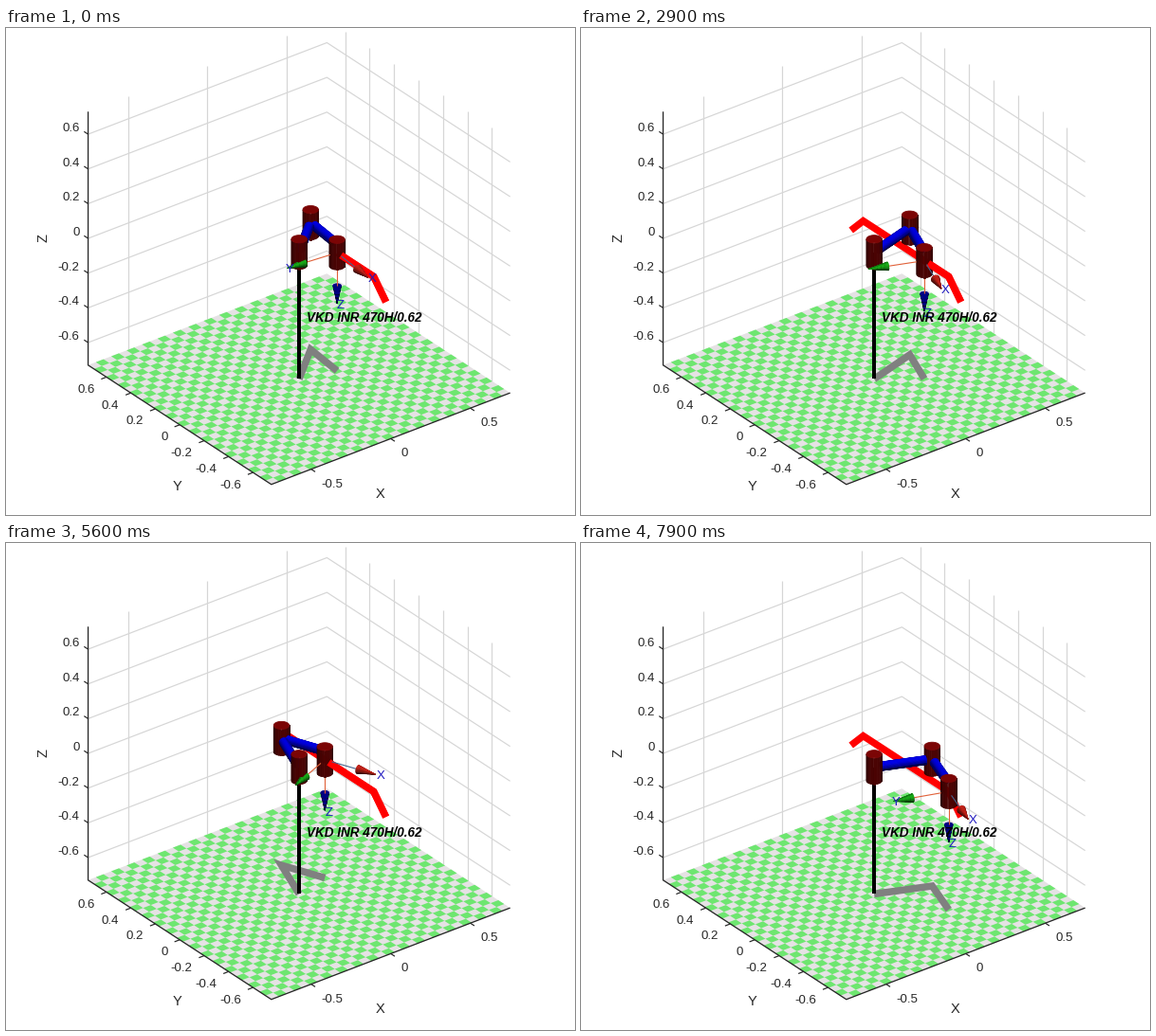
Write a matplotlib script that moves like this. It is 600 px wide and 514 px high and loops after 8000 ms.

```python
import numpy as np
import matplotlib.pyplot as plt
from matplotlib.animation import FuncAnimation
from matplotlib.collections import PolyCollection

W, H, DPI = 600, 514, 100
PX = 72 / DPI
FRAMES, STEP = 80, 100
plt.rcParams["font.family"] = "Liberation Sans"

# Orthographic view, azimuth -37.5, elevation 30
SCALE, ORIGIN = 211.6, np.array([309.1, 236.7])
AZ, EL = np.radians(37.5), np.radians(30)
CA, SA = np.cos(AZ), np.sin(AZ)
VIEW = np.array([-SA * np.cos(EL), -CA * np.cos(EL), np.sin(EL)])
LIGHT = np.array([-0.15, -0.35, 0.92])
R, ZR = 0.75, 0.73

# Arm
L1, L2 = 0.3, 0.25
JOINT_R, JOINT_H, LINK_R = 0.039, 0.076, 0.022
DARK_RED, BLUE = (130, 5, 5), (0, 0, 235)
AXIS_COL = {"X": (200, 35, 25), "Y": (25, 175, 25), "Z": (0, 0, 140)}
LINE_COL = {"X": "#46648c", "Y": "#e06038", "Z": "#e06038"}

# Lift, eight carry positions, lower
PATH = np.array([[0.2, -0.45, -0.15]]
                + [[0.2, y, -0.05] for y in np.linspace(-0.35, 0.35, 8)]
                + [[0.2, 0.45, -0.15]])
LAST = len(PATH) - 1


def proj(p):
    x, y, z = np.moveaxis(np.asarray(p, float), -1, 0)
    sx = CA * x - SA * y
    sy = np.sin(EL) * (SA * x + CA * y) + np.cos(EL) * z
    return ORIGIN + SCALE * np.stack([sx, -sy], axis=-1)


def rgb(c, k=1.0):
    return tuple(min(1, v * k / 255) for v in c)


fig = plt.figure(figsize=(W / DPI, H / DPI), dpi=DPI, facecolor="white")
ax = fig.add_axes([0, 0, 1, 1])
ax.set(xlim=(0, W), ylim=(H, 0))
ax.axis("off")


def line(pts, color, width, z):
    p = proj(pts)
    return ax.plot(p[:, 0], p[:, 1], color=color, lw=width * PX, zorder=z,
                   solid_capstyle="butt", solid_joinstyle="miter")[0]


def text(x, y, s, size=13.3, color="#262626", ha="center", z=60, **kw):
    return ax.text(x, y, s, fontsize=size * PX, color=color, ha=ha,
                   va="center", zorder=z, **kw)


def draw_axes():
    zt = np.arange(-3, 4) * 0.2
    xt = (-0.5, 0, 0.5)
    grid, ink = "#d6d6d6", "#262626"
    for z in zt:
        line([(-R, R, z), (R, R, z), (R, -R, z)], grid, 1.2, 1)
    for x in xt:
        line([(x, R, -ZR), (x, R, ZR)], grid, 1.2, 1)
    for y in zt:
        line([(R, y, -ZR), (R, y, ZR)], grid, 1.2, 1)

    # Checkered floor
    n = 31
    e = np.linspace(-R, R, n + 1)
    floor = [(-R, -R, -ZR), (R, -R, -ZR), (R, R, -ZR), (-R, R, -ZR)]
    ax.add_collection(PolyCollection([proj(floor)], zorder=2,
                                     facecolors="#e5e2e4", edgecolors="none"))
    tiles = [proj([(e[i], e[j], -ZR), (e[i + 1], e[j], -ZR),
                   (e[i + 1], e[j + 1], -ZR), (e[i], e[j + 1], -ZR)])
             for i in range(n) for j in range(n) if (i + j) % 2]
    ax.add_collection(PolyCollection(tiles, zorder=2.1, facecolors="#6ee670",
                                     edgecolors="none"))

    line([(-R, R, ZR), (-R, R, -ZR), (-R, -R, -ZR), (R, -R, -ZR)], ink, 1.3, 3)
    t = 0.033
    for v in zt:
        s = f"{v:.1f}" if abs(v) > 0.01 else "0"
        line([(-R, R, v), (-R, R + t, v)], ink, 1.2, 3)
        x, y = proj((-R, R, v))
        text(x - 9, y - 6, s, ha="right")
        line([(-R, v, -ZR), (-R - t, v, -ZR)], ink, 1.2, 3)
        x, y = proj((-R, v, -ZR))
        text(x - 12.5, y + 13.5, s, ha="right")
    for v in xt:
        line([(v, -R, -ZR), (v, -R - t, -ZR)], ink, 1.2, 3)
        x, y = proj((v, -R, -ZR))
        text(x + 11, y + 16, f"{v:g}", ha="left")
    text(394.5, 492, "X", 14.6)
    text(180, 484.5, "Y", 14.6)
    text(39.5, 222, "Z", 14.6, rotation=90)
    text(317, 306, "VKD INR 470H/0.62", 13.5, "black", "left",
         weight="bold", style="italic")


def in_base(p):
    return np.hypot(p[0], p[1]) < JOINT_R and abs(p[2]) < JOINT_H


def tube(a, b, ra, rb, color, n=24, hidden=lambda p: False):
    """Shaded visible facets of a cylinder or cone from a to b."""
    a, b = np.asarray(a, float), np.asarray(b, float)
    length = np.linalg.norm(b - a)
    w = (b - a) / length
    u = np.cross(w, (0, 0, 1) if abs(w[2]) < 0.9 else (1, 0, 0))
    u /= np.linalg.norm(u)
    v = np.cross(w, u)
    ang = np.linspace(0, 2 * np.pi, n + 1)[:, None]
    ring = np.cos(ang) * u + np.sin(ang) * v
    lo, hi = a + ra * ring, b + rb * ring
    polys, cols = [], []

    def add(poly, normal):
        if normal @ VIEW > 0 and not hidden(poly.mean(axis=0)):
            polys.append(proj(poly))
            cols.append(rgb(color, 0.32 + 0.68 * max(0, normal @ LIGHT)))

    for i in range(n):
        normal = ring[i] + ring[i + 1] + 2 * w * (ra - rb) / length
        add(np.array([lo[i], lo[i + 1], hi[i + 1], hi[i]]),
            normal / np.linalg.norm(normal))
    add(lo, -w)
    add(hi, w)
    return polys, cols


def cone(a, b, r, color, slices=5):
    """Arrow head in slices, without the facets buried in the base joint."""
    polys, cols = [], []
    cuts = np.linspace(0, 1, slices + 1)
    for s, t in zip(cuts, cuts[1:]):
        p, c = tube(a + (b - a) * s, a + (b - a) * t, r * (1 - s),
                    r * (1 - t), color, 16, in_base)
        polys += p
        cols += c
    return polys, cols


def solid(parts, z):
    polys, cols = parts
    coll = PolyCollection(polys, facecolors=cols, edgecolors=cols,
                          linewidths=0.8 * PX, zorder=z)
    return ax.add_collection(coll)


def arm(tool):
    """Elbow position and direction of the second link."""
    x, y, _ = tool
    q2 = -np.arccos((x * x + y * y - L1**2 - L2**2) / (2 * L1 * L2))
    q1 = np.arctan2(y, x) - np.arctan2(L2 * np.sin(q2), L1 + L2 * np.cos(q2))
    elbow = np.array([L1 * np.cos(q1), L1 * np.sin(q1), 0])
    return elbow, q1 + q2


def phase(frame):
    """Path steps made so far; the pace drifts slightly."""
    return int(np.floor(np.interp(frame, (0, 22, 35, 44, 56, 64, 79),
                                  (4, 16, 25, 31, 41, 47, 55)) + 0.5))


live = []


def update(frame):
    while live:
        live.pop().remove()
    step = phase(frame)
    k = LAST - abs(step % (2 * LAST) - LAST)
    tool = PATH[k]
    elbow, yaw = arm(tool)
    base = np.zeros(3)
    wrist = tool * (1, 1, 0)
    up = np.array([0, 0, 1.0])

    drop = ZR * up
    live.append(line([base - drop, elbow - drop, wrist - drop],
                     "#808080", 7.5, 4))
    seen = PATH[:min(step, LAST) + 1]
    live.append(line(seen, "red", 7.4, 5))

    # (depth, draw function) pairs, painted far to near
    items = []

    def joint(p):
        items.append((p @ VIEW, lambda z: solid(
            tube(p - JOINT_H * up, p + JOINT_H * up,
                 JOINT_R, JOINT_R, DARK_RED), z)))

    def link(a, b):
        d = (b - a) / np.linalg.norm(b - a) * 0.034
        items.append(((a + b) @ VIEW / 2, lambda z: solid(
            tube(a + d, b - d, LINK_R, LINK_R, BLUE), z)))

    items.append((-0.001, lambda z: line([base - drop, base], "black", 4, z)))
    joint(base)
    joint(elbow)
    joint(tool)
    link(base, elbow)
    link(elbow, wrist)
    depth = tool @ VIEW
    if k in (0, LAST):
        items.append((depth - 0.001, lambda z: solid(
            tube(tool, wrist, LINK_R, LINK_R, BLUE), z)))
    if 1 < k < LAST:
        near = [tool - (0, 0.032, 0)] + list(PATH[k - 1::-1])
        items.append((depth + 0.001, lambda z: line(near, "red", 7.4, z)))

    c, s = np.cos(yaw), np.sin(yaw)
    dirs = {"X": (c, s, 0), "Y": (s, -c, 0), "Z": (0, 0, -1)}
    for name, d in dirs.items():
        d = np.array(d, float)
        a, b, tip = tool + 0.04 * d, tool + 0.19 * d, tool + 0.29 * d
        items.append(((a + b) @ VIEW / 2, lambda z, a=a, b=b, n=name:
                      line([a, b], LINE_COL[n], 1.1, z)))
        items.append(((b + tip) @ VIEW / 2, lambda z, b=b, t=tip, n=name:
                      solid(cone(b, t, 0.021, AXIS_COL[n]), z)))
        x, y = proj(tool + 0.3 * d) + (4, 1)
        if name != "Y" or abs(x - ORIGIN[0]) > 5:
            live.append(text(x, y, name, 13.3, "#2019c0", z=50))

    items.sort(key=lambda it: it[0])
    for i, (_, draw) in enumerate(items):
        live.append(draw(6 + i))
    return live


draw_axes()
anim = FuncAnimation(fig, update, frames=FRAMES, interval=STEP,
                     init_func=lambda: [], repeat=True, repeat_delay=0,
                     blit=False)
plt.show()
```
